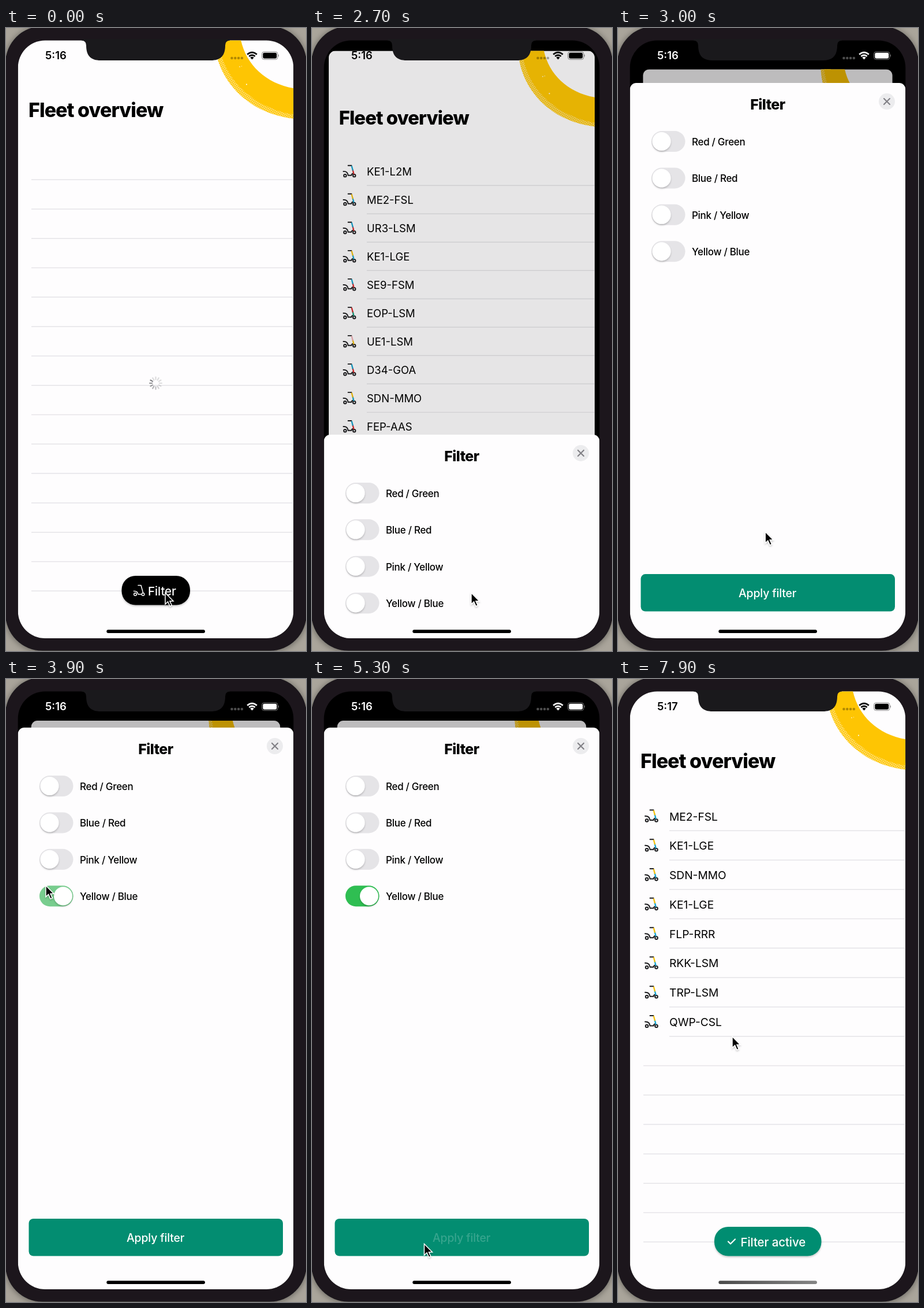
An HTML page for the animation above (8000 ms loop, 520x1077 px).

```html
<!DOCTYPE html>
<html lang="en">
<head>
<meta charset="utf-8">
<title>Fleet overview</title>
<style>
  html, body { margin: 0; width: 100%; height: 100%; overflow: hidden; background: #aaa59b; }
  svg { display: block; width: 520px; height: 1077px; font-family: Inter, Roboto, sans-serif; }
  .title { font-weight: 800; }
  .label { font-weight: 500; }
  .line { fill: none; stroke-linecap: round; stroke-linejoin: round; }
</style>
</head>
<body>
<svg viewBox="0 0 520 1077">
  <defs>
    <clipPath id="screenClip"><rect x="20.700" y="21.500" width="477.600" height="1033.500" rx="47"/></clipPath>
    <clipPath id="cardClip"><rect x="20.700" y="21" width="477.600" height="1060" rx="12"/></clipPath>
    <pattern id="halftone" width="3" height="3" patternUnits="userSpaceOnUse" patternTransform="rotate(30)">
      <rect width="3" height="3" fill="#fec503"/><circle cx="1.5" cy="1.5" r=".85" fill="#fff"/>
    </pattern>
    <linearGradient id="homeGrey"><stop stop-color="#4a4a4a"/><stop offset="1" stop-color="#858585"/></linearGradient>
    <filter id="soft" x="-30%" y="-30%" width="160%" height="180%">
      <feDropShadow dx="0" dy="2" stdDeviation="1.8" flood-opacity=".22"/>
    </filter>
    <filter id="phoneShadow" x="-5%" y="-5%" width="110%" height="110%">
      <feDropShadow dx="0" dy="1" stdDeviation="6" flood-opacity=".45"/>
    </filter>
  </defs>

  <rect x="-1" y="-3" width="522" height="1079.500" rx="64" fill="#1a191c" filter="url(#phoneShadow)"/>

  <g clip-path="url(#screenClip)">
    <rect width="520" height="1077"/>
    <g id="card"><g clip-path="url(#cardClip)">
      <rect x="20" y="21" width="479" height="1060" fill="#fefdfe"/>
      <path fill="url(#halftone)" d="M361 18Q362 40 367 55C384 108 431 149 500 157V145C445 138 394 100 380 18Z"/>
      <path fill="#fec503" d="M367 18Q370 40 376 55C392 101 439 140 500 150V104.500C449 96 415 62 406.500 18Z"/>
      <g fill="#fff"><circle cx="417" cy="97.500" r="1.100"/><circle cx="405" cy="67" r=".8"/><circle cx="408.500" cy="66" r=".6"/></g>
      <text class="title" x="39" y="153.500" font-size="34" letter-spacing="-.95">Fleet overview</text>
      <g id="rows"></g>
      <g id="spinner"></g>
      <g id="pill">
        <rect id="pillBox" y="947" height="50.500" rx="24" filter="url(#soft)"/>
        <g class="line" stroke="#fff" stroke-width="1.500" id="pillScooter">
          <circle cx="224" cy="979" r="2.300"/><circle cx="237.500" cy="979" r="2.300"/>
          <path d="M229 963.500H234L237.500 976M221.500 973.500Q228 973 229 979H234"/>
        </g>
        <path id="check" class="line" stroke="#fff" stroke-width="2.200" d="M191 972.500L195 976.500L203 968.500"/>
        <text id="pillText" class="label" y="981" font-size="20.500" letter-spacing="-.1" fill="#fff"></text>
      </g>
      <rect id="dim" x="20" y="21" width="479" height="1060"/>
    </g></g>

    <g id="sheet">
      <rect x="20.700" width="477.600" height="1100" rx="11" fill="#fefdfe"/>
      <text class="title" x="259.500" y="46" font-size="25" letter-spacing="-.6" text-anchor="middle">Filter</text>
      <circle cx="466" cy="32" r="14" fill="#ececee"/>
      <path class="line" stroke="#828187" stroke-width="2.200" d="M461 27L471 37M471 27L461 37"/>
      <g id="toggles"></g>
      <rect x="39.500" y="849" width="440.500" height="64.500" rx="8" fill="#038d71"/>
      <text id="apply" class="label" x="259" y="889" font-size="19.500" letter-spacing="-.2" text-anchor="middle" fill="#fff">Apply filter</text>
    </g>
    <rect id="home" x="174.300" y="1040.200" width="170.700" height="5.800" rx="2.900"/>
  </g>

  <path fill="#1a191c" d="M131 19V21.500Q139 22 139 30C139 48 147 56 164 56H355C372 56 380 48 380 30Q380 22 388 21.500V19Z"/>

  <g id="status">
    <text id="clock" x="68" y="54" font-size="18.500" font-weight="600"></text>
    <g opacity=".3"><circle cx="391.500" cy="52" r="2.300"/><circle cx="397.300" cy="52" r="2.300"/><circle cx="403.100" cy="52" r="2.300"/><circle cx="408.900" cy="52" r="2.300"/></g>
    <path d="M426.500 54.500L423.300 51Q426.500 48.500 429.700 51Z"/>
    <path fill="none" stroke="currentColor" stroke-width="2.600" d="M421.300 49Q426.500 44.700 431.700 49M418.200 45.800Q426.500 38.300 434.800 45.800"/>
    <rect x="443.500" y="41" width="27.500" height="13.500" rx="4" fill="none" stroke="currentColor" stroke-opacity=".45"/>
    <rect x="445.300" y="42.800" width="23.900" height="9.900" rx="2.400"/>
    <path d="M472 45.500Q474 47.700 472 50Z" opacity=".5"/>
  </g>

  <path id="cursor" stroke="#fff" stroke-width="1.500" filter="url(#soft)" d="M0 0V19.500L4.600 15.300L8 23L11.300 21.600L8 14.200H14Z"/>
</svg>

<script>
const LOOP = 8000, LOADED = 2000, OPEN = 2628, TOGGLE = 3760, CLOSE = 5350, MINUTE = 6700;
const ROW = 50.79, GREEN = '#038d71';
const $ = id => document.getElementById(id);
const set = (id, attrs) => { for (const k in attrs) $(id).setAttribute(k, attrs[k]); };
const clamp = x => Math.min(1, Math.max(0, x));
const smooth = x => { x = clamp(x); return x * x * (3 - 2 * x); };
const spring = ms => { const x = Math.max(0, ms) * 0.0174; return 1 - (1 + x) * Math.exp(-x); };

const colours = { b: '#16a5cf', r: '#d9292b', y: '#f5c211', g: '#169b7c', p: '#f0b3b8' };
const fleet = ['KE1-L2M br', 'ME2-FSL yb', 'UR3-LSM br', 'KE1-LGE yb', 'SE9-FSM br', 'EOP-LSM rg',
  'UE1-LSM py', 'D34-GOA br', 'SDN-MMO yb', 'FEP-AAS br', 'KE1-LGE yb', 'FLP-RRR yb',
  'RKK-LSM yb', 'TRP-LSM yb', 'QWP-CSL yb'];

function scooter(y, [top, low]) {
  return `<g class="line" stroke="#1c1c1e" stroke-width="2" transform="translate(46 ${y})">
    <path d="M9.500 -11H15.500M1 -.5Q8.500 -1 9.500 6.500H15.500Q16 3.500 19 3"/>
    <circle cx="4" cy="7" r="2.300"/><circle cx="20.500" cy="7" r="2.300"/>
    <g stroke-width="2.400"><path stroke="${colours[low]}" d="M17.800 -3L19.500 3.500"/><path stroke="${colours[top]}" d="M16 -9.500L17.800 -3"/></g></g>`;
}

function listMarkup(items) {
  let out = '';
  for (let i = 0; i < 15; i++) {
    const y = 237.5 + i * ROW, [name, pair] = (items[i] || '').split(' ');
    out += `<path stroke="#e5e4e8" stroke-width="1.500" d="M${name ? 89 : 44} ${y + 24.7}H499"/>`;
    if (name) out += scooter(y, pair) + `<text x="89" y="${y + 7}" font-size="19.200">${name}</text>`;
  }
  return out;
}
const lists = {
  empty: listMarkup([]),
  all: listMarkup(fleet),
  filtered: listMarkup(fleet.filter(s => s.endsWith('yb')))
};

$('spinner').innerHTML = Array.from({ length: 12 }, (_, i) =>
  `<rect x="-1.100" y="-11.500" width="2.200" height="6.300" rx="1.100" fill="#55555a" transform="translate(259.500 614) rotate(${i * 30})"/>`).join('');

$('toggles').innerHTML = ['Red / Green', 'Blue / Red', 'Pink / Yellow', 'Yellow / Blue'].map((name, i) =>
  `<g transform="translate(0 ${101 + i * 63.4})">
    <rect x="58" y="-18" width="58.500" height="36" rx="18" fill="#e5e4e7"/>
    <rect class="on" x="58" y="-18" width="58.500" height="36" rx="18" fill="#2fbe52" opacity="0"/>
    <circle class="knob" cx="75.500" r="16" fill="#fff" filter="url(#soft)"/>
    <text class="label" x="128" y="7" font-size="17" letter-spacing="-.3">${name}</text></g>`).join('');
const lastOn = document.querySelectorAll('.on')[3], lastKnob = document.querySelectorAll('.knob')[3];

// start, end, x, y of each pointer move
const moves = [[2770, 3650, 69, 357], [4000, 4450, 198, 1036], [4600, 4850, 194.5, 976.5], [7300, 7850, 198, 618]];
function pointer(t) {
  let x = 276, y = 976.5;
  for (const [start, end, toX, toY] of moves) {
    const u = smooth((t - start) / (end - start));
    x += (toX - x) * u ** 1.3;
    y += (toY - y) * u;
  }
  return `translate(${x} ${y})`;
}

let shown;
function showList(state) {
  if (state === shown) return;
  shown = state;
  const active = state === 'filtered';
  $('rows').innerHTML = lists[state];
  set('spinner', { visibility: state === 'empty' ? 'visible' : 'hidden' });
  set('pillBox', { x: active ? 167 : 200.5, width: active ? 185.5 : 118.5, fill: active ? GREEN : '#000' });
  set('pillScooter', { visibility: active ? 'hidden' : 'visible' });
  set('check', { visibility: active ? 'visible' : 'hidden' });
  set('pillText', { x: active ? 212.5 : 246 });
  $('pillText').textContent = active ? 'Filter active' : 'Filter';
}

function draw(t) {
  const p = t < CLOSE ? spring(t - OPEN) : 1 - spring(t - CLOSE);
  showList(t < LOADED ? 'empty' : t < CLOSE ? 'all' : 'filtered');

  const head = Math.floor(10 + t * 0.012);
  [...$('spinner').children].forEach((spoke, i) => {
    const age = ((head - i) % 12 + 12) % 12;
    spoke.setAttribute('opacity', Math.max(0.2, 0.72 - age * 0.09));
  });

  const scale = 1 - 0.0965 * p;
  set('card', { transform: `translate(259.5 ${21 + 51 * p}) scale(${scale}) translate(-259.5 -21)` });
  set('dim', { opacity: 0.26 * p });
  set('sheet', { transform: `translate(0 ${1055 - 971 * p})`, visibility: p > 0.001 ? 'visible' : 'hidden' });

  lastKnob.setAttribute('cx', 75.5 + 23.5 * smooth((t - TOGGLE) / 140));
  lastOn.setAttribute('opacity', smooth((t - TOGGLE) / 250));
  const press = smooth((t - 5120) / 120) - smooth((t - 5330) / 150);
  set('apply', { opacity: 1 - 0.8 * press });

  const ink = p > 0.5 ? '#fff' : '#000';
  set('status', { fill: ink, color: ink });
  $('clock').textContent = t < MINUTE ? '5:16' : '5:17';
  set('home', { fill: t > 6000 ? 'url(#homeGrey)' : '#000' });
  set('cursor', { transform: pointer(t) });
}

const begin = performance.now();
function tick() {
  draw((performance.now() - begin) % LOOP);
  requestAnimationFrame(tick);
}
tick();
</script>
</body>
</html>
```
